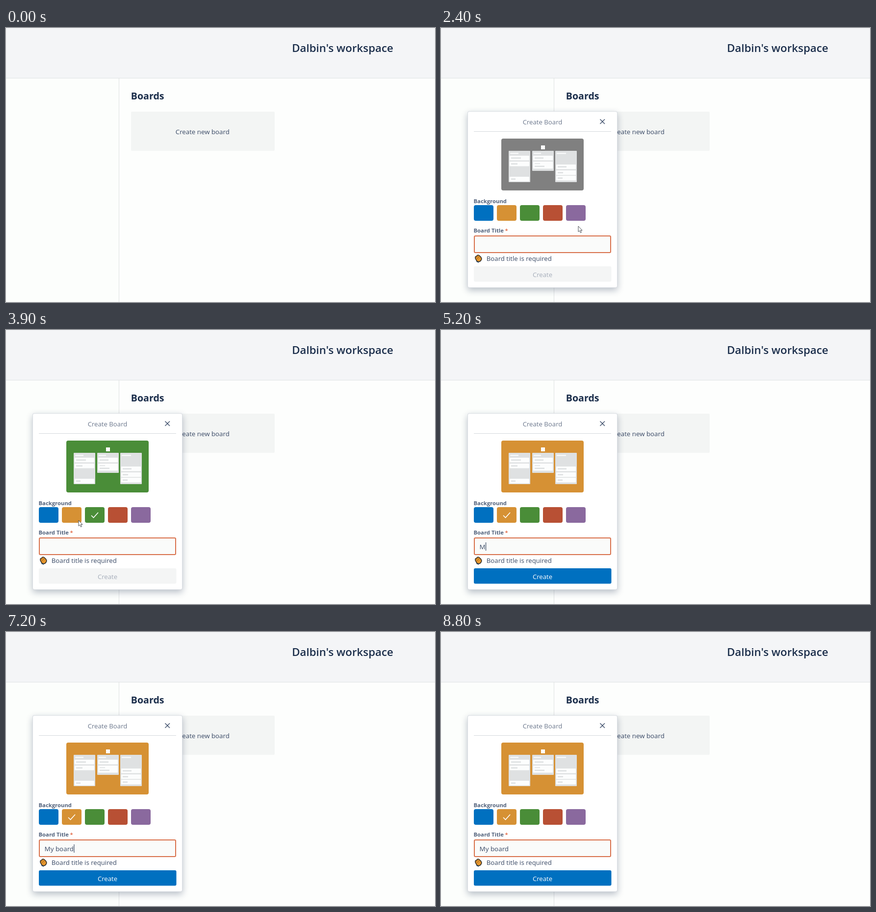
An HTML page with a canvas that plays this animation: 875x560 px, repeating every 9.3 s.

```html
<!DOCTYPE html>
<html lang="en">
<head>
<meta charset="utf-8">
<title>Create board</title>
<style>
html, body { margin: 0; width: 100%; height: 100%; overflow: hidden; background: #fdfefd; }
canvas { display: block; width: 875px; height: 560px; }
</style>
</head>
<body>
<canvas id="stage"></canvas>
<script>
const W = 875, H = 560, LOOP = 9300, STEP = 100;
const canvas = document.getElementById('stage');
const ctx = canvas.getContext('2d');
const dpr = window.devicePixelRatio || 1;
canvas.width = W * dpr;
canvas.height = H * dpr;

const FAMILY = '"Open Sans", "Noto Sans", sans-serif';
const INK = '#1b2e4b', BODY = '#3a4a66', LABEL = '#50607a', BLUE = '#0070c0';
const SWATCHES = [BLUE, '#d69134', '#4a8d38', '#b85034', '#8a699e'];
const TITLE = 'My board';

const ENTER = 900, OPEN = 1700, FIRST_PICK = 2700, PICK_GAP = 430;
const FOCUS = 4450, TYPE = 5200, KEY_GAP = 128, BLINK = 530;
const TYPED = TYPE + (TITLE.length - 1) * KEY_GAP;

// Pointer stops: time, x, y
const PATH = [
  [ENTER, 840, 410], [1400, 414, 222], [OPEN, 414, 222], [2400, 280, 405],
  [FIRST_PICK, 276, 380], [3900, 148, 389], [4300, 165, 442]
];

const clamp = (v, lo, hi) => Math.min(hi, Math.max(lo, v));
const ease = u => u * u * (3 - 2 * u);

// Picks run from the last swatch down to the second
function pickedAt(t) {
  if (t < FIRST_PICK) return -1;
  return Math.max(1, SWATCHES.length - 1 - Math.floor((t - FIRST_PICK) / PICK_GAP));
}

function typedAt(t) {
  return TITLE.slice(0, Math.max(0, Math.floor(1 + (t - TYPE) / KEY_GAP)));
}

// The caret stays solid while typing, then blinks
function caretAt(t) {
  if (t < FOCUS) return false;
  const idle = t < TYPE ? t - FOCUS : Math.max(0, t - TYPED);
  return idle % (2 * BLINK) < BLINK;
}

function pointerAt(t) {
  const i = PATH.findIndex(p => p[0] > t);
  if (i < 0) return PATH[PATH.length - 1].slice(1);
  const [t0, x0, y0] = PATH[i - 1], [t1, x1, y1] = PATH[i];
  const k = ease((t - t0) / (t1 - t0));
  return [x0 + (x1 - x0) * k, y0 + (y1 - y0) * k];
}

function rect(x, y, w, h, color, r = 0) {
  ctx.fillStyle = color;
  ctx.beginPath();
  ctx.roundRect(x, y, w, h, r);
  ctx.fill();
}

function text(str, x, y, size, color, weight = 400, align = 'left') {
  ctx.font = `${weight} ${size}px ${FAMILY}`;
  ctx.textAlign = align;
  ctx.fillStyle = color;
  ctx.fillText(str, x, y);
}

function line(points, color, width) {
  ctx.strokeStyle = color;
  ctx.lineWidth = width;
  ctx.beginPath();
  points.forEach(([x, y]) => ctx.lineTo(x, y));
  ctx.stroke();
}

function shape(path, fill, stroke, width) {
  const p = new Path2D(path);
  ctx.fillStyle = fill;
  ctx.fill(p);
  ctx.strokeStyle = stroke;
  ctx.lineWidth = width;
  ctx.lineJoin = 'round';
  ctx.stroke(p);
}

function drawPage() {
  rect(0, 0, W, H, '#fdfefd');
  rect(0, 0, W, 102, '#f4f5f7');
  rect(0, 102, W, 1, '#dfe2e4');
  rect(0, 103, 230, H - 103, '#fcfefc');
  rect(230, 103, 1, H - 103, '#dfe2e2');
  text("Dalbin's workspace", 686.5, 49, 22.3, INK, 600, 'center');
  text('Boards', 254.8, 146, 19.6, INK, 700);
  rect(255, 171, 293, 80, '#f3f5f4', 2);
  text('Create new board', 400.8, 217, 13.3, BODY, 400, 'center');
}

function drawList(x, height, cards) {
  const bar = y => 9 + (x + y) * 7 % 13;
  rect(x, 251, 44, height, '#dfe1e2', 1);
  rect(x + 3, 255, bar(255), 2.5, '#f8f9f9');
  for (const y of cards) {
    rect(x + 2, y, 40, 9.5, '#fcfdfd', 1);
    rect(x + 5, y + 3.5, bar(y), 2.5, '#dcdfe0');
  }
}

function drawPreview(color) {
  rect(123, 226, 168, 106, color, 4);
  rect(204, 240, 8, 8, '#fff');
  drawList(138, 64, [261, 273, 304]);
  drawList(186, 41, [261, 273, 278]);
  drawList(233, 64, [279, 291, 302]);
}

function drawHand() {
  ctx.save();
  ctx.translate(76.5, 471);
  ctx.rotate(-0.65);
  ctx.lineCap = 'round';
  shape('M-5 -4 Q-3 -8 0 -6 Q4 -8 5 -3 Q7 5 1 6.5 Q-5 7 -6 2 Z', '#e8982e', '#2b2824', 1.6);
  for (const x of [-1.8, 1.6]) line([[x, -4.5], [x, 0]], '#7a4d1c', 0.8);
  line([[-6.5, 3], [-4.5, 6]], '#2b4560', 2);
  ctx.restore();
}

function drawSwatches(picked) {
  SWATCHES.forEach((color, i) => {
    const x = 67 + i * 47;
    rect(x, 362, 40, 32, color, 4);
    if (i === picked) line([[x + 13, 379], [x + 17.5, 383.5], [x + 27, 373]], '#fff', 1.6);
  });
}

function drawModal(t) {
  const picked = pickedAt(t), value = typedAt(t);

  ctx.save();
  ctx.shadowColor = 'rgba(9,30,66,.28)';
  ctx.shadowBlur = 14 * dpr;
  ctx.shadowOffsetY = 5 * dpr;
  rect(54, 170, 306, 361, '#d9dde2', 4);
  ctx.restore();
  rect(55, 171, 304, 359, '#fff', 3);

  text('Create Board', 207, 197, 13.2, '#6b778c', 400, 'center');
  line([[324.5, 186.5], [334, 196]], '#42526e', 1.5);
  line([[334, 186.5], [324.5, 196]], '#42526e', 1.5);
  rect(67, 211, 280, 1, '#d5d9dd');

  drawPreview(SWATCHES[picked] || '#808080');
  text('Background', 66.5, 358, 11.3, LABEL, 700);
  drawSwatches(picked);

  text('Board Title', 66.5, 418, 11.3, LABEL, 700);
  text('*', 130.5, 418, 11.3, '#e0603a', 600);
  rect(67, 424, 280, 36, '#d9714c', 3);
  rect(69, 426, 276, 32, '#fafbfa', 1);
  text(value, 78.6, 448, 13.4, BODY);
  if (caretAt(t)) rect(79 + ctx.measureText(value).width, 434, 1, 17, INK);

  drawHand();
  text('Board title is required', 92.8, 476, 13.2, BODY);
  rect(67, 487, 280.5, 31.5, value ? BLUE : '#f4f5f5', 3);
  text('Create', 207, 509, 13.2, value ? '#fff' : '#a5adba', 400, 'center');
}

function drawPointer(t) {
  if (t < ENTER || t >= TYPE) return;
  const [x, y] = pointerAt(t);
  const inside = (l, top, w, h) => x > l && x < l + w && y > top && y < top + h;
  const overModal = t >= OPEN && inside(55, 171, 304, 359);
  const edge = '#3c4046';
  ctx.save();
  ctx.translate(x, y);
  if (overModal && inside(67, 424, 280, 36)) {
    line([[0, -7], [0, 7]], edge, 1);
    for (const end of [-7, 7]) line([[-2.5, end], [2.5, end]], edge, 1);
  } else if (!overModal && inside(255, 171, 293, 80)) {
    shape('M-1 1 Q0 -1 1.5 1 V6 Q3 4.5 4 6.3 Q5.6 5.2 6.4 7 Q8.4 6.4 8.4 9 V12 L6.6 16.3 H-.2 L-3.6 11.2 Q-4.8 8.8 -2.6 9 L-1 10.5 Z', '#fff', edge, 0.9);
  } else {
    shape('M0 0 V11.5 L2.6 9.2 L4.5 13.5 L6.5 12.6 L4.6 8.5 H8 Z', '#fff', edge, 0.9);
  }
  ctx.restore();
}

function frame(ms) {
  const t = Math.floor((ms % LOOP) / STEP) * STEP;
  ctx.setTransform(dpr, 0, 0, dpr, 0, 0);
  drawPage();
  if (t >= OPEN) drawModal(t);
  drawPointer(t);
}

const start = performance.now();
function tick() {
  frame(performance.now() - start);
  requestAnimationFrame(tick);
}
tick();
</script>
</body>
</html>
```
